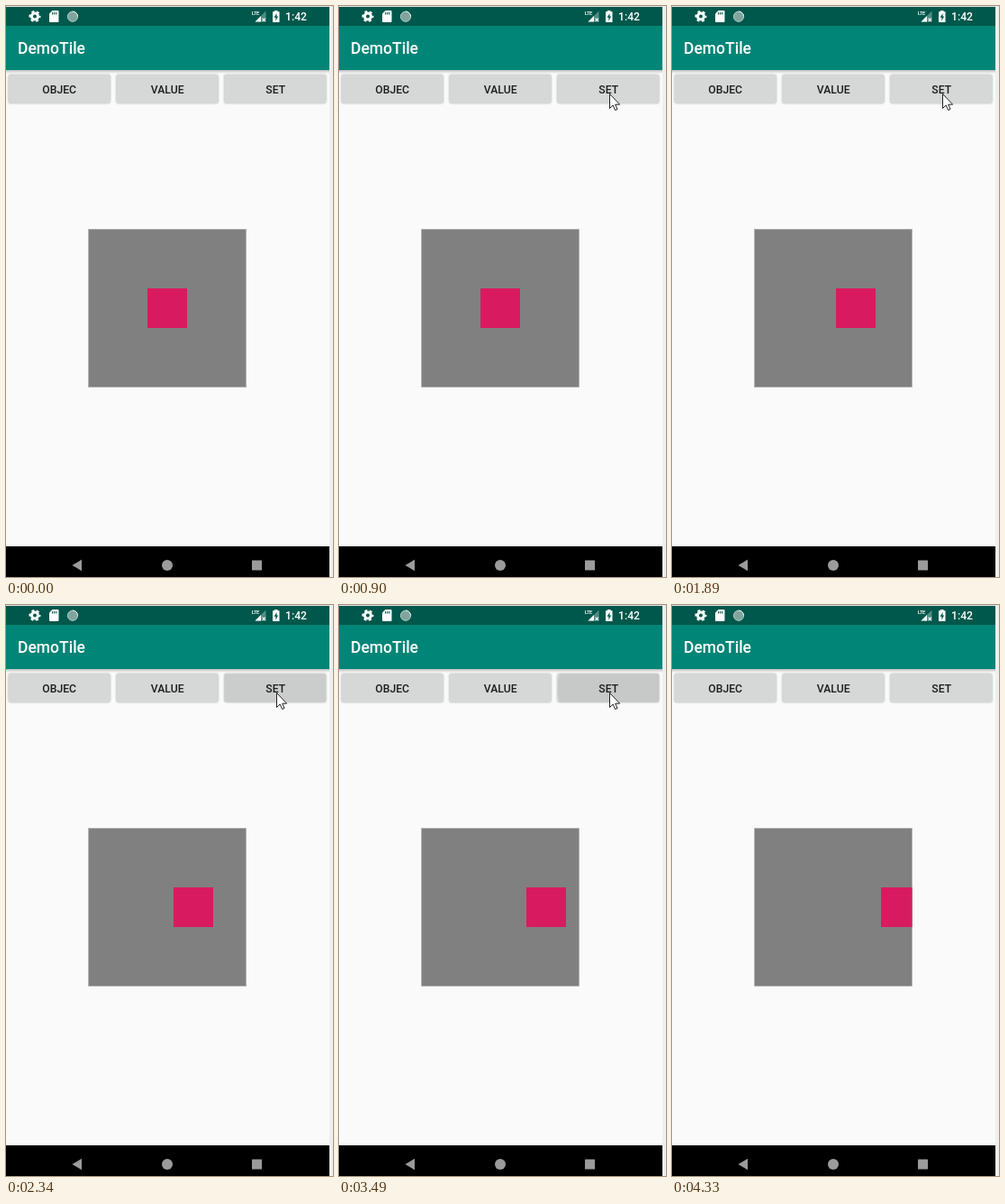
Recreate the animation shown at these times as an HTML page. Size 363x633 px, loop 4710 ms.

```html
<!DOCTYPE html>
<html lang="en">
<head>
<meta charset="utf-8">
<title>Set animation</title>
<style>
  html, body { margin: 0; width: 100%; height: 100%; overflow: hidden; background: #fafafa; }
  svg { display: block; width: 363px; height: 633px; }
  text { font-family: Roboto, sans-serif; font-weight: 500; }
  .face { fill: #d6d7d7; filter: drop-shadow(0 .6px .9px #0000004d); }
  .label { font-size: 12.2px; fill: #1d1d1d; text-anchor: middle; }
</style>
</head>
<body>
<svg viewBox="0 0 363 633">
  <defs>
    <linearGradient id="shade" x2="0" y2="1">
      <stop stop-color="#000" stop-opacity=".24"/>
      <stop offset="1" stop-color="#000" stop-opacity="0"/>
    </linearGradient>
    <clipPath id="panelClip"><rect x="92" y="248" width="174.6" height="174"/></clipPath>
    <clipPath id="setClip"><rect x="242.4" y="76.2" width="112.8" height="31.6" rx="1.8"/></clipPath>
  </defs>

  <rect width="363" height="633" fill="#fafafa"/>

  <!-- app bar -->
  <rect y="71" width="359" height="4" fill="url(#shade)"/>
  <rect y="1" width="359" height="21" fill="#00574b"/>
  <rect y="22" width="359" height="49" fill="#008577"/>
  <text x="13" y="53" font-size="17.5" fill="#fff">DemoTile</text>

  <!-- status icons -->
  <g fill="#fff">
    <circle cx="32" cy="11.5" r="3.5" fill="none" stroke="#fff" stroke-width="3"/>
    <circle cx="32" cy="11.5" r="5.5" fill="none" stroke="#fff" stroke-width="2" stroke-dasharray="2.9 2.86" stroke-dashoffset="1.45"/>
    <path d="M51.5 5H57.5Q58.5 5 58.5 6V17Q58.5 18 57.5 18H49Q48 18 48 17V8.5Z"/>
    <path d="M51.6 7v2.4M53.7 7v2.4M55.8 7v2.4" stroke="#00574b" stroke-width="1.1"/>
    <circle cx="74" cy="11.7" r="5.6" fill="#7fa59e" stroke="#b3cbc6"/>
    <path d="M74 6.1A5.6 5.6 0 0 1 79.6 11.7" fill="none" stroke="#e6efed"/>
    <text x="272.8" y="10" font-size="6" letter-spacing="-.5">LTE</text>
    <path d="M276.5 17.5L288.5 5.5V17.5Z" opacity=".32"/>
    <path d="M276.5 17.5L283 11V17.5Z"/>
    <path d="M284.6 13.6l3.4 3.6m0-3.6l-3.4 3.6" stroke="#fff" stroke-width="1.1"/>
    <path d="M298 5H301.5V6.3H303.5V18H296V6.3H298Z"/>
    <path d="M300.5 8L297.6 12.7H299.4V16.4L302.2 11.5H300.5Z" fill="#00574b"/>
    <text x="310" y="16" font-size="12.2">1:42</text>
  </g>

  <g id="faces"></g>
  <circle id="ripple" cx="300" clip-path="url(#setClip)"/>
  <g id="labels"></g>

  <!-- panel with moving square -->
  <rect x="91.5" y="247.5" width="175" height="175" fill="#808080" stroke="#b4b4b4" stroke-width=".8"/>
  <g clip-path="url(#panelClip)">
    <rect id="box" y="313" width="44" height="44" fill="#d81b60"/>
  </g>

  <!-- navigation bar and margins -->
  <rect y="599" width="359" height="34" fill="#000"/>
  <g fill="#9b9b9b">
    <path d="M73.5 620L84 613.8V626.2Z"/>
    <circle cx="179" cy="620" r="6"/>
    <rect x="273" y="614.5" width="11" height="11" rx=".6"/>
  </g>
  <rect x="359" width="4" height="633" fill="#efefef"/>
  <rect width="363" height="1" fill="#e8e8e8"/>

  <path id="cursor" d="M.5 .5V16.5L4.2 13L6.6 18.5L9 17.5L6.7 12.2H11.6Z" fill="#fff" stroke="#222"/>
</svg>

<script>
const LOOP = 4710, TICK = 64.7, TICK_LEAD = 8;
const START_X = 157, SHIFT = 25, MOVE = 1000;
const clicks = [958, 2080, 3348];

// The pointer drifts evenly in x and slows down in y by the given power.
const glides = [
  { begin: 100, end: 720, from: [249, 604], to: [300, 97], power: 2.4 },
  { begin: 3500, end: 3817, from: [300, 97], to: [279, 575], power: 2.4 },
  { begin: 3817, end: 4140, from: [279, 575], to: [322, 640], power: 1 }
];

const $ = id => document.getElementById(id);
const clamp = v => Math.min(1, Math.max(0, v));
const mix = (a, b, k) => a + (b - a) * k;
const easeInOut = v => (1 - Math.cos(Math.PI * clamp(v))) / 2;
const easeOut = (v, power) => 1 - (1 - clamp(v)) ** power;

["OBJEC", "VALUE", "SET"].forEach((label, i) => {
  $("faces").innerHTML +=
    `<rect class="face" x="${2.8 + 119.8 * i}" y="76.2" width="112.8" height="31.6" rx="1.8"/>`;
  $("labels").innerHTML += `<text class="label" x="${59.2 + 120 * i}" y="96.8">${label}</text>`;
});

function drawBox(t) {
  const x = clicks.reduce((sum, start) => sum + SHIFT * easeInOut((t - start) / MOVE), START_X);
  $("box").setAttribute("x", Math.round(x));
}

function drawRipple(t) {
  const age = t - (clicks.findLast(start => start <= t) ?? -LOOP);
  const grow = easeOut(age / 200, 2);
  $("ripple").setAttribute("cy", mix(97, 92, grow));
  $("ripple").setAttribute("r", 62 * grow);
  $("ripple").setAttribute("fill-opacity", age > 800 ? 0 : 0.12 * Math.exp(-age / 280));
}

function drawCursor(t) {
  const visible = t >= glides[0].begin && t < glides.at(-1).end;
  $("cursor").setAttribute("visibility", visible ? "visible" : "hidden");
  if (!visible) return;
  const { begin, end, from, to, power } = glides.findLast(g => g.begin <= t);
  const k = clamp((t - begin) / (end - begin));
  const x = Math.round(mix(from[0], to[0], k));
  const y = Math.round(mix(from[1], to[1], easeOut(k, power)));
  $("cursor").setAttribute("transform", `translate(${x} ${y})`);
}

const origin = performance.now();

function frame() {
  const now = (performance.now() - origin) % LOOP;
  const t = Math.floor((now + TICK_LEAD) / TICK) * TICK;
  drawBox(t);
  drawRipple(t);
  drawCursor(t);
  requestAnimationFrame(frame);
}
frame();
</script>
</body>
</html>
```
